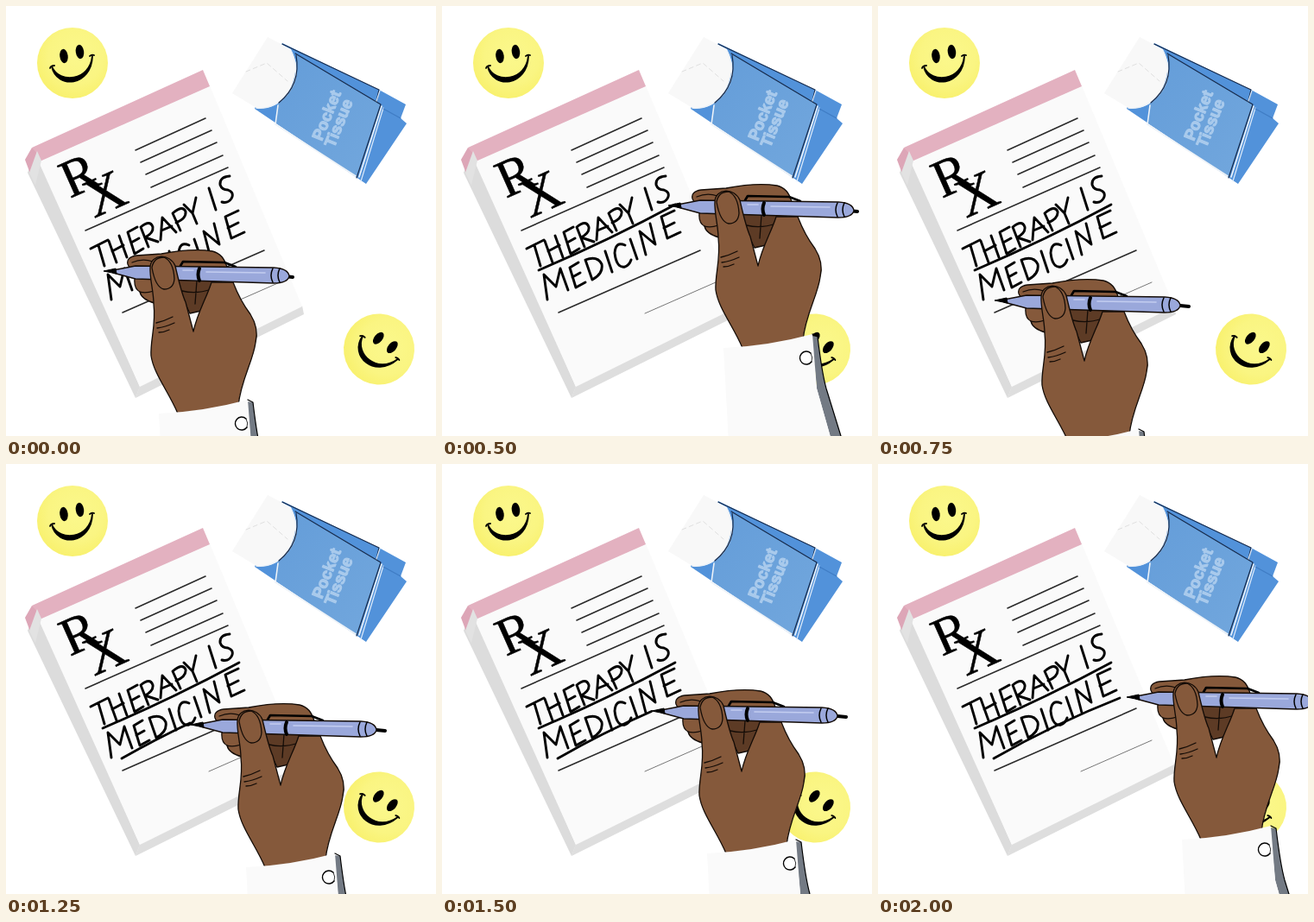
These frames come from a looping animation (498x498 px, 3 s). An HTML page:

```html
<!DOCTYPE html>
<html lang="en">
<head>
<meta charset="utf-8">
<title>Therapy is medicine</title>
<style>
  html, body { margin: 0; width: 100%; height: 100%; overflow: hidden; background: #fff; }
  svg { display: block; width: 498px; height: 498px; }
  .ink { fill: none; stroke: #000; stroke-linecap: round; stroke-linejoin: round; }
  .rule { stroke: #2b2b2b; stroke-width: 1.6; }
  .letters { stroke-width: 2.9; }
  .underline { stroke-width: 2.8; stroke-dasharray: 100 300; }
  .skin { fill: #85593b; }
  .edge { stroke: #140c07; stroke-width: 1.3; stroke-linejoin: round; stroke-linecap: round; }
  .rx { font-family: "Liberation Serif", "Times New Roman", serif; stroke: #000; stroke-width: .5; }
  .brand { font: bold 18.5px "Liberation Sans", Arial, sans-serif; fill: #a9caec; stroke: #a9caec; stroke-width: 1.2; stroke-linejoin: round; text-anchor: middle; }

  .hand, .first, .second, .clicker { animation: 3s step-end infinite; }
  .hand { animation-name: write; }
  .first { animation-name: first; }
  .second { animation-name: second; }
  .clicker { animation-name: click; }

  @keyframes write {
    0% { transform: translate(0, 0); }
    8.333% { transform: translate(59px, -30px); }
    16.666% { transform: translate(149px, -76px); }
    25% { transform: translate(22px, 34px); }
    33.333% { transform: translate(58px, 14px); }
    41.666% { transform: translate(101px, -5px); }
    50% { transform: translate(130px, -21px); }
    58.333% { transform: translate(166px, -35px); }
    66.666%, 100% { transform: translate(175px, -37px); }
  }
  @keyframes first {
    0% { stroke-dashoffset: 104; }
    8.333% { stroke-dashoffset: 61; }
    16.666%, 100% { stroke-dashoffset: 0; }
  }
  @keyframes second {
    0% { stroke-dashoffset: 104; }
    33.333% { stroke-dashoffset: 72; }
    41.666% { stroke-dashoffset: 45; }
    50% { stroke-dashoffset: 25; }
    58.333%, 100% { stroke-dashoffset: 0; }
  }
  @keyframes click {
    0% { transform: translateX(0); }
    25%, 100% { transform: translateX(6px); }
  }
</style>
</head>
<body>
<svg viewBox="0 0 498 498">
  <defs>
    <radialGradient id="glow" cx=".55" cy=".4" r=".65">
      <stop offset="0" stop-color="#fbf88c"/>
      <stop offset=".6" stop-color="#faf582"/>
      <stop offset="1" stop-color="#f8f06a"/>
    </radialGradient>
    <linearGradient id="wrap" x1="0" y1="0" x2="1" y2="1">
      <stop offset="0" stop-color="#649dd9"/>
      <stop offset="1" stop-color="#72a7dd"/>
    </linearGradient>
    <g id="smiley">
      <circle r="41" fill="url(#glow)"/>
      <ellipse cx="-10" cy="-8" rx="4.7" ry="8.2" transform="rotate(-8 -10 -8)"/>
      <ellipse cx="8.5" cy="-13" rx="4.7" ry="8.2" transform="rotate(-8 8.5 -13)"/>
      <path d="M-24 4C-18 31 22 27 23-8C20 21-15 25-24 4Z" stroke="#000" stroke-width="1.8" stroke-linejoin="round"/>
      <path class="ink" stroke-width="1.8" d="M-26 6Q-25 3-21 3M20-8Q23-10 25-9"/>
    </g>
  </defs>

  <!-- prescription pad -->
  <path fill="#dcdcdc" d="M25 193L36 168L155 441L150 454Z"/>
  <path fill="#dedede" d="M155 440L343 347L345 357L150 454Z"/>
  <path fill="#fafafa" d="M34 172L235 90L343 348L155 441Z"/>
  <path fill="#e3b1c0" d="M30 164L228 74L236 93L39 180Z"/>
  <path fill="#dda6b7" d="M30 164L22 178L28 194L37 172Z"/>
  <path fill="#e2e2e2" d="M27 193L36 168L41 179L34 207Z"/>
  <path class="ink rule" d="M150 167L231 130M156 181L238 144M162 195L244 158M168 210L251 173M92 260L257 187M135 355L299 283"/>
  <path class="ink" stroke-width="1" style="stroke:#777" d="M235 356L317 320"/>
  <text class="rx" font-size="62" transform="translate(74 223) rotate(-24)">R</text>
  <text class="rx" font-size="64" transform="translate(102 246) rotate(-24)">X</text>

  <!-- hand lettering -->
  <g class="ink letters" role="img" aria-label="THERAPY IS MEDICINE">
    <path d="M98 281L118 271M107 277L114 301
      M119 272L128 297M131 266L140 291M123 284L136 277
      M152 256L141 262L149 287L159 281M145 274L154 269
      M165 279L156 256Q167 247 170 256Q171 263 161 268L176 273
      M179 271L181 245L197 262M180 260L192 255
      M202 260L193 240Q205 230 208 238Q209 246 197 251
      M206 230L216 240L220 222M216 240L221 252
      M235 211L243 236
      M259 197Q247 198 248 207Q250 213 257 213Q265 216 261 223Q257 229 250 227"/>
    <path d="M122 340L118 311L132 325L137 304L146 329
      M158 297L148 303L155 326L166 320M151 314L160 309
      M174 317L166 294Q180 289 185 299Q187 310 174 317
      M189 284L197 308
      M212 277Q201 272 200 286Q202 304 212 302Q217 300 219 294
      M218 270L226 293
      M236 288L229 261L247 276L241 252
      M269 237L254 244L261 269L276 262M257 257L269 251"/>
  </g>
  <path class="ink underline first" pathLength="100" d="M112 306Q196 270 270 230"/>
  <path class="ink underline second" pathLength="100" d="M134 341Q204 301 280 271"/>

  <!-- tissues -->
  <path fill="#5292da" d="M320 43L432 97L463 114L457 130L464 136L417 206L288 119Z"/>
  <path fill="#f8f8f8" d="M303 36L330 50Q343 75 328 100Q312 121 290 118L262 101Z"/>
  <path class="ink" style="stroke:#e0e0e0" stroke-width="1" stroke-dasharray="5 4" d="M278 76L302 66L326 87"/>
  <path fill="url(#wrap)" d="M336 56L434 114L407 198L313 136L315 113Q338 95 336 56Z"/>
  <path class="ink" style="stroke:#eef3f8" stroke-width="1.6" d="M330 52Q344 80 325 103Q310 120 290 118M315 115L312 137L405 197M435 116L409 198"/>
  <path class="ink" style="stroke:#172b4c" stroke-width="1.2" d="M320 44L432 97L429 110M335 55L434 114L406 199M336 57Q342 91 316 112"/>
  <path class="ink" style="stroke:#dceafa" stroke-width="1.2" d="M433 98L429 110M437 118L411 203"/>
  <path class="ink" style="stroke:#3f7cc4" stroke-width="1.2" d="M457 130L437 119"/>
  <g class="brand">
    <text transform="translate(377 129) rotate(-68)">Pocket</text>
    <text transform="translate(391 138) rotate(-68)">Tissue</text>
  </g>

  <use href="#smiley" transform="translate(77 66)"/>
  <use href="#smiley" transform="translate(432 397.500) rotate(48)"/>

  <!-- hand with pen -->
  <g class="hand">
    <path class="skin edge" d="M141 299Q139 291 151 289L180 287Q216 280 239 284Q252 287 256 303L240 325L172 344Q157 340 155 331Q148 327 149 316Z"/>
    <path class="ink edge" d="M146 297Q158 292 170 296M155 331Q162 333 171 330"/>
    <path class="edge" fill="#5d3b25" d="M196 310L253 314L240 336L226 353L213 356L205 340Z"/>
    <path class="ink edge" d="M204 330Q220 334 238 328M221 318L219 345"/>

    <path class="ink" stroke-width="2.6" d="M202 301L205 296L253 297L266 302"/>
    <path class="ink clicker" stroke-width="4" d="M322 313L332 314"/>
    <path class="edge" fill="#9aa8db" d="M124 306L150 301L310 303Q327 304 328 313Q326 321 310 321L150 316L124 309Z"/>
    <path stroke="#000" d="M113 307L127 304L128 310Z"/>
    <path class="ink" style="stroke:#c3cdf0" stroke-width="1.6" d="M232 308L300 309M205 306L217 306"/>
    <path class="ink" stroke-width="4" d="M224 304Q221 311 224 318"/>
    <path class="ink" stroke-width="1.5" d="M309 304Q305 312 309 320M317 304Q313 312 317 320"/>

    <path class="skin edge" d="M199 472C188 446 171 426 168 405C167 386 174 370 171 345
      C171 330 166 315 167 302C168 287 190 286 196 301C200 318 203 332 208 343L217 377
      C222 354 232 339 238 320L263 320C268 333 274 345 283 357C290 368 292 378 289 390
      C286 412 272 433 269 463Z"/>
    <path class="ink edge" d="M169 303Q171 291 183 291Q194 296 195 316Q194 328 183 328Q173 326 169 303"/>
    <path class="ink edge" d="M174 367Q183 365 193 360M175 373Q184 372 195 367M177 378Q183 378 189 375"/>

    <path fill="#737a84" d="M279 458L286 459Q291 501 296 519L321 600L308 600L285 519Z"/>
    <path fill="#fafafa" d="M177 472Q228 470 280 456L285 519L308 600L184 600Z"/>
    <path class="ink" stroke-width="1.2" d="M280 456L286 459Q291 501 296 519L321 600"/>
    <circle cx="273" cy="484" r="7.500" fill="#fff"/>
    <path class="ink" stroke-width="1.4" d="M278 478A7.500 7.500 0 1 0 279 488"/>
    <path class="ink" stroke-width=".8" d="M278 478Q281 483 279 488"/>
  </g>
</svg>
</body>
</html>
```
